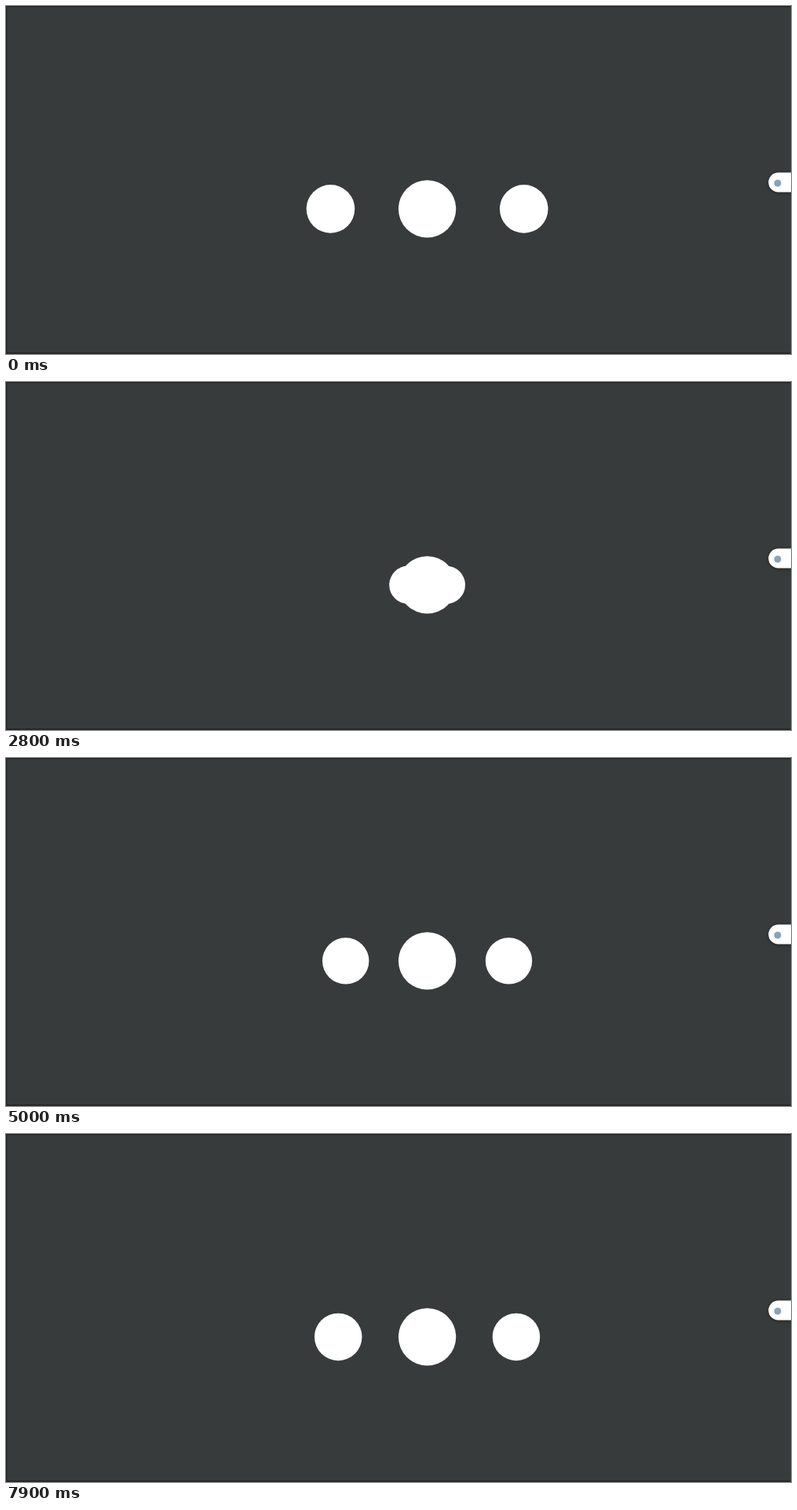
Animation, 1000 px wide and 444 px high, one loop 8 s. Source, as an HTML page:

```html
<!DOCTYPE html>
<html lang="en">
<head>
<meta charset="utf-8">
<title>Three dots</title>
<style>
  html, body { margin: 0; width: 100%; height: 100%; overflow: hidden; background: #383b3b; }
  svg { display: block; width: 100vw; height: 100vh; }
  .tab { filter: drop-shadow(0 1px 2px #0006); }
</style>
</head>
<body>
<svg viewBox="0 0 1000 444">
  <rect width="1000" height="444" fill="#383b3b"/>
  <path d="M1000 .5H.5V443H1000" fill="none" stroke="#1f2122" stroke-width="1.5"/>
  <g fill="#fff">
    <circle class="side" cy="258.9"/>
    <circle class="side" cy="258.9"/>
    <circle cx="536.6" cy="258.9" r="36.65"/>
  </g>
  <rect class="tab" x="971.3" y="212.5" width="60" height="25" rx="12.5" fill="#fff"/>
  <circle cx="983" cy="226" r="4.5" fill="#87a3b5"/>
</svg>
<script>
  const CENTER = 536.6, RADIUS = 36.65;
  const HALF = 2000;   // ms from widest to closed
  const PEAK = 400;    // ms at which the dots are widest
  const STEP = 100;    // ms each pose is held
  const sides = document.querySelectorAll('.side');
  const start = performance.now();

  function draw(now) {
    const elapsed = Math.max(0, now - start) + 8;
    const t = Math.floor(elapsed / STEP) * STEP % (2 * HALF);
    const away = Math.abs(t - PEAK);
    const open = 1 - Math.min(away, 2 * HALF - away) / HALF;
    const scale = 0.6 + 0.3 * open;
    const offset = 5 * RADIUS * open * scale;
    sides.forEach((dot, i) => {
      dot.setAttribute('cx', CENTER + (i ? offset : -offset));
      dot.setAttribute('r', RADIUS * scale);
    });
    requestAnimationFrame(draw);
  }
  draw(start);
</script>
</body>
</html>
```
